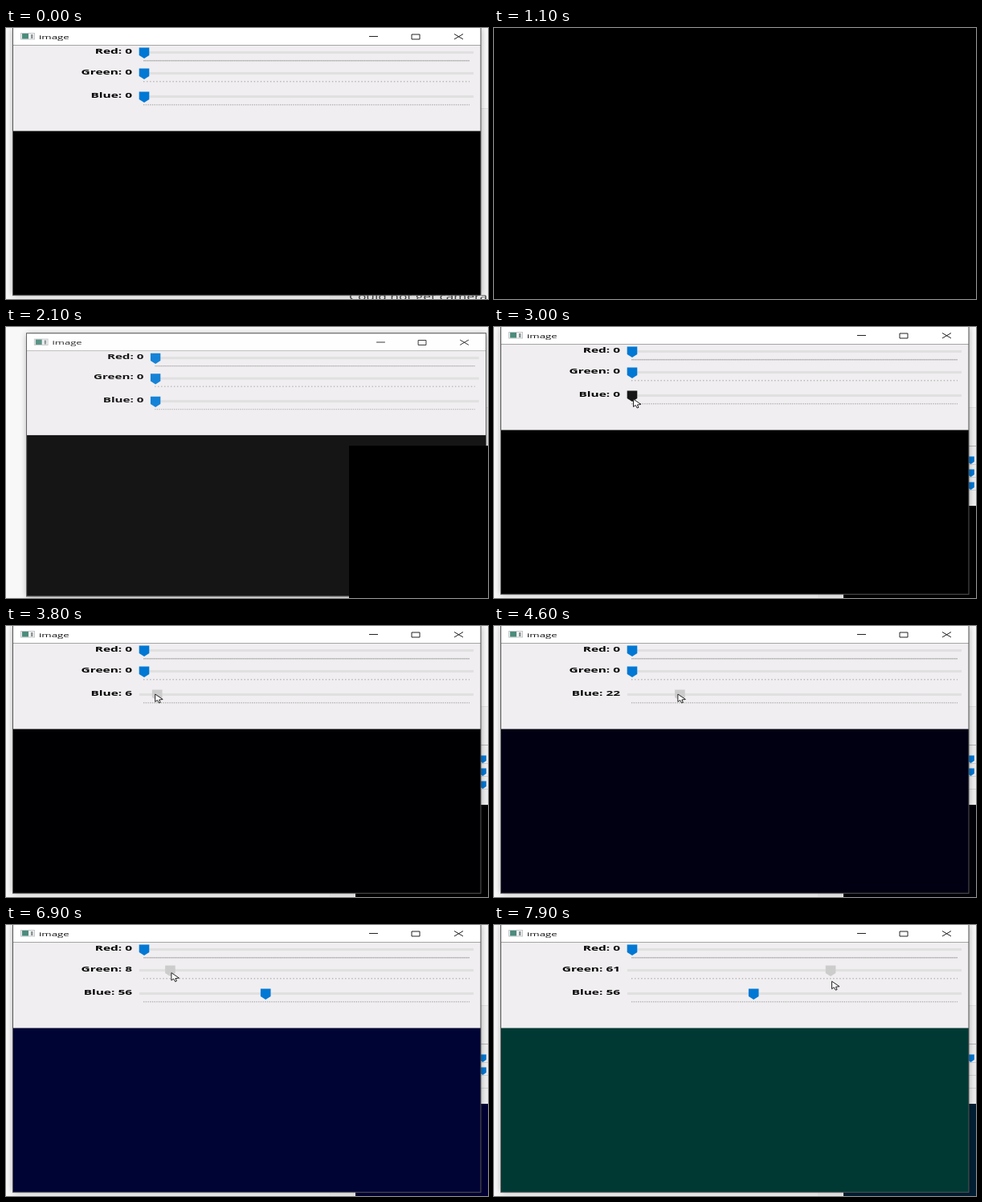
An HTML page with a canvas for the animation above (8 s loop, 600 px wide and 338 px high).

```html
<!DOCTYPE html>
<html lang="en">
<head>
<meta charset="utf-8">
<title>Colour sliders</title>
<style>
html, body { margin: 0; height: 100%; overflow: hidden; background: #000; }
canvas { display: block; }
</style>
</head>
<body>
<canvas id="stage" width="600" height="338"></canvas>
<script>
const ctx = document.getElementById('stage').getContext('2d');
const LOOP = 8000, STEP = 100;
const ACCENT = '#0078d4', HOVER = '#171717', PRESSED = '#ccc';
const PIXEL_ASPECT = 1.66; // the screen is shown squashed vertically

const within = (t, a, b) => t >= a && t < b;
const tone = v => Math.max(0, v - 4);

// Straight moves between points of the form [time, ...values].
function along(points, t) {
  const i = points.findIndex(p => p[0] > t);
  if (i === 0) return points[0].slice(1);
  if (i < 0) return points.at(-1).slice(1);
  const [a, b] = [points[i - 1], points[i]];
  const p = (t - a[0]) / (b[0] - a[0]);
  return a.slice(1).map((v, n) => v + (b[n + 1] - v) * p);
}

const blueAt = t => Math.round(along([[3500, 0], [4600, 22], [4800, 22], [5400, 56]], t)[0]);
const greenAt = t => Math.round(along([[6500, 0], [6900, 8], [7900, 61]], t)[0]);

// The window eases in from the lower right, and starts back that way on closing.
function shiftAt(t) {
  if (within(t, 900, 1100)) return 1;
  return within(t, 1900, 2300) ? 4 * (1 - (t - 1900) / 400) ** 2 : 0;
}

function rect(x, y, w, h, color) {
  ctx.fillStyle = color;
  ctx.fillRect(x, y, w, h);
}

function poly(points, fill, stroke) {
  ctx.beginPath();
  points.forEach(([x, y]) => ctx.lineTo(x, y));
  ctx.closePath();
  ctx.fillStyle = fill;
  ctx.fill();
  if (stroke) {
    ctx.strokeStyle = stroke;
    ctx.lineWidth = 1;
    ctx.stroke();
  }
}

function text(str, x, y, font, color, align = 'left') {
  ctx.save();
  ctx.scale(PIXEL_ASPECT, 1);
  ctx.font = font + ' "Open Sans", sans-serif';
  ctx.textAlign = align;
  ctx.fillStyle = color;
  ctx.fillText(str, x / PIXEL_ASPECT, y);
  ctx.restore();
}

function thumb(x, y, color, s = 1) {
  poly([[-6.3, -6.5], [6.3, -6.5], [6.3, 3], [0, 7], [-6.3, 3]]
    .map(([dx, dy]) => [x + dx * s, y + dy * s]), color);
}

function slider(name, value, max, y, color) {
  text(`${name}: ${value}`, 157, y + 0.6, 'bold 9.3px', '#000', 'right');
  rect(166, y - 2, 416, 3, '#e0e0e0');
  const pitch = 405 / max;
  ctx.strokeStyle = '#b8b8b8';
  ctx.lineWidth = 1.4;
  ctx.setLineDash([1.4, pitch - 1.4]);
  ctx.beginPath();
  ctx.moveTo(171, y + 9.7);
  ctx.lineTo(577, y + 9.7);
  ctx.stroke();
  ctx.setLineDash([]);
  thumb(172 + value * pitch, y, color);
}

function titleBar() {
  rect(9, 0, 582, 21, '#fff');
  rect(9, 21, 582, 1, '#a5a5a5');
  rect(18, 6, 18, 8.5, '#c3c7c8');
  rect(19, 7, 16, 6.5, '#f4f4f4');
  rect(20, 7, 8, 6.5, '#4c8c7c');
  rect(31, 8, 2.5, 5, '#8d9496');
  text('image', 41, 14, '8px', '#111');
  ctx.strokeStyle = '#222';
  ctx.lineWidth = 1;
  ctx.beginPath();
  ctx.moveTo(452, 10.5); ctx.lineTo(463, 10.5);
  ctx.rect(505, 8, 10, 6);
  ctx.moveTo(558, 7.5); ctx.lineTo(569, 14);
  ctx.moveTo(569, 7.5); ctx.lineTo(558, 14);
  ctx.stroke();
}

function appWindow(t, green, blue) {
  const shift = shiftAt(t), scale = 1 - 0.018 * shift;
  ctx.save();
  ctx.globalAlpha = 1 - 0.085 * shift ** 1.5;
  ctx.translate(17.2 * shift, 8.7 * shift);
  ctx.scale(scale, scale);
  ctx.shadowColor = 'rgba(0,0,0,.35)';
  ctx.shadowBlur = 8;
  rect(9, 0, 582, 333, '#fff');
  ctx.shadowColor = 'transparent';
  titleBar();
  rect(9, 22, 582, 106.5, '#f0eef0');
  rect(9, 128.5, 582, 204.5, `rgb(0,${tone(green)},${tone(blue)})`);
  ctx.strokeStyle = '#555';
  ctx.lineWidth = 1;
  ctx.strokeRect(8.5, -1, 582.5, 334.3);
  const blueColor = within(t, 3000, 3500) ? HOVER : within(t, 3500, 5600) ? PRESSED : ACCENT;
  const greenColor = t >= 6500 ? PRESSED : t >= 6200 ? HOVER : ACCENT;
  slider('Red', 0, 255, 31, ACCENT);
  slider('Green', green, 100, 57, greenColor);
  slider('Blue', blue, 150, 86, blueColor);
  ctx.restore();
}

// Recorder preview, mostly hidden behind the window; it lags the screen.
function preview(t) {
  const green = greenAt(t - 500), blue = blueAt(t - 500);
  rect(435, 148, 165, 190, `rgb(0,${tone(green)},${tone(blue)})`);
  if (!within(t, 200, 1100) && t < 2600) return;
  rect(435, 148, 165, 75, '#efefef');
  rect(435, 148, 165, 1, '#b5b5b5');
  [0, green, blue].forEach((value, i) => {
    const y = 166 + i * 16;
    rect(590, y + 5, 10, 0.8, '#ccc');
    if (!value) thumb(593.5, y, i === 2 && within(t, 3100, 3700) ? HOVER : ACCENT, 0.7);
  });
}

function cursor(t, green, blue) {
  if (t < 2500) return;
  let [x, y] = along([[2400, 420, 190], [2800, 180, 93], [3000, 173, 90], [3500, 170, 85],
    [5400, 320, 85], [5700, 233, 71], [6000, 183, 59], [6300, 173, 58]], t);
  if (within(t, 3500, 5500)) x = 169 + blue * 2.7;
  if (t >= 6500) [x, y] = [173 + green * 4.05, 58 + green * 0.2];
  poly([[0, 0], [0, 9.5], [2.7, 7.5], [4.7, 11], [6.5, 10.3], [4.9, 7], [9.5, 6.5]]
    .map(([dx, dy]) => [x + dx + 0.5, y + dy]), '#fff', '#222');
}

function draw(t) {
  rect(0, 0, 600, 338, '#000');
  if (within(t, 1100, 1900)) return;
  const green = greenAt(t), blue = blueAt(t);
  rect(0, 0, 600, 338, '#f8f8f8');
  rect(403, 100, 197, 238, '#f1f1f1');
  rect(403, 100, 197, 1, '#e2e2e2');
  if (t < 100) text('Could not get camera', 427, 339, '10.4px', '#444');
  else preview(t);
  appWindow(t, green, blue);
  if (within(t, 1900, 2300)) rect(427, 148, 173, 190, '#000');
  cursor(t, green, blue);
}

function frame(now) {
  draw(Math.floor(now % LOOP / STEP) * STEP);
  requestAnimationFrame(frame);
}
requestAnimationFrame(frame);
</script>
</body>
</html>
```
